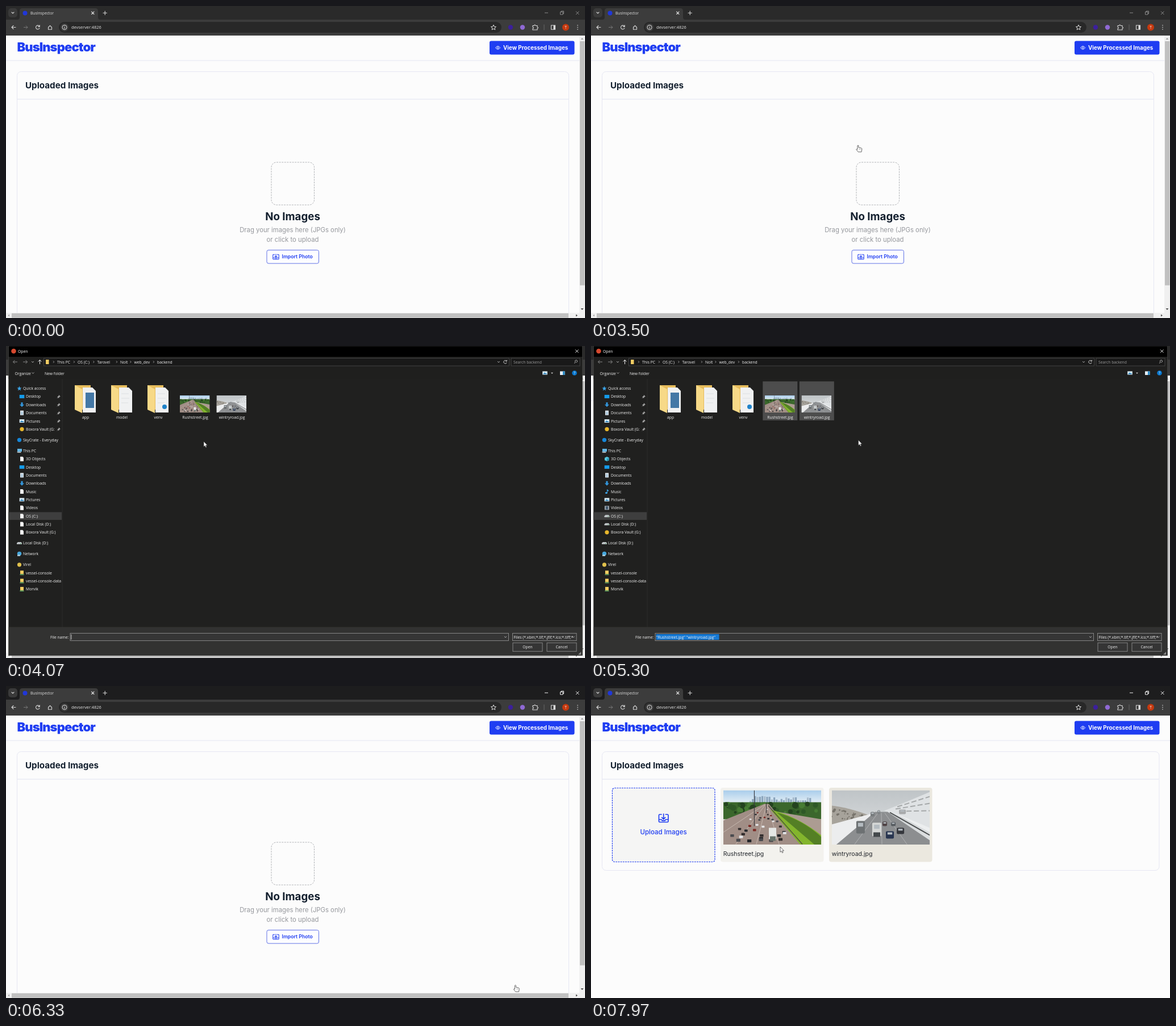
These frames come from a looping animation (1019 px wide and 549 px high, 8000 ms). An HTML page:

```html
<!DOCTYPE html>
<html lang="en">
<head>
<meta charset="utf-8">
<title>Image upload demo</title>
<style>
html, body { margin: 0; width: 100%; height: 100%; overflow: hidden; background: #fcfcfc; }
svg { display: block; width: 100vw; height: 100vh; }
.ui { font-family: "Open Sans", "Noto Sans", sans-serif; }
.page { font-family: Inter, "Open Sans", sans-serif; }
text { white-space: pre; }
</style>
</head>
<body>
<svg id="stage" viewBox="0 0 1019 549" preserveAspectRatio="none"></svg>
<script>
const LOOP = 8000;
const BLUE = '#1f3df2', INK = '#14202f';
const APP = 'BusInspector', FILES = ['Rushstreet.jpg', 'wintryroad.jpg'];

// Markup helpers
const rect = (x, y, w, h, fill, more = '') => `<rect x="${x}" y="${y}" width="${w}" height="${h}" fill="${fill}" ${more}/>`;
const circle = (x, y, r, fill) => `<circle cx="${x}" cy="${y}" r="${r}" fill="${fill}"/>`;
const shape = (d, fill, more = '') => `<path d="${d}" fill="${fill}" ${more}/>`;
const line = (d, color, width = 1, more = '') => shape(d, 'none', `stroke="${color}" stroke-width="${width}" ${more}`);
const text = (x, y, s, size, fill, more = '') => `<text x="${x}" y="${y}" font-size="${size}" fill="${fill}" ${more}>${s}</text>`;
const group = (id, body, more = '') => `<g id="${id}" ${more}>${body}</g>`;
const at = (x, y, body) => `<g transform="translate(${x} ${y})">${body}</g>`;
const range = n => [...Array(n).keys()];
const middle = 'text-anchor="middle"';

function random(seed) {
  return () => (seed = (seed * 16807) % 2147483647) / 2147483647;
}

// Photos, drawn in a 172 x 95.5 box
function cityRoad() {
  const rnd = random(41);
  const towers = range(26).map(i => {
    const h = 4 + rnd() * 9;
    return rect(46 + i * 4.2, 23 - h, 3.2, h, i % 3 ? '#8ba5bd' : '#a9bccd');
  }).join('');
  const bushes = range(46).map(i =>
    circle(rnd() * 172, 24 + rnd() * 15, 2 + rnd() * 4, ['#2f5927', '#477c34', '#24431f'][i % 3])).join('');
  const cars = range(34).map(i => {
    const d = .12 + .85 * rnd(), lane = [-1.05, -.75, -.45, -.15, .12, .38, .6][i % 7], w = 1.5 + 6 * d;
    return rect(76 + lane * 70 * d - w / 2, 25 + 64 * d, w, w * .7, ['#25272b', '#4a4b4f', '#e3e4e6', '#342f2f', '#7c2924'][i % 5], 'rx=".6"');
  }).join('');
  return rect(0, 0, 172, 26, 'url(#sky)') + towers + rect(0, 21, 172, 30, '#3b672c') + bushes +
    shape('M84 36L172 51V95.5H90Z', '#ac9c92') +
    shape('M72 24H80L138 95.5H0V53Z', '#a18e86') +
    shape('M83 34Q130 46 172 79V95.5H135Z', '#83b52d') +
    shape('M94 39Q140 52 172 82V95.5H160Z', '#547f25') +
    line('M76 25L58 95M77 25L98 95M74 25L22 95M73 25L0 74', '#ddd3cb', .6) +
    line('M79 27L139 95', '#4d4b40', 1.3) + cars +
    rect(80, 66, 13, 20, '#e5e7e5') + rect(82, 81, 10, 8, '#69746c') +
    line('M54.5 0V63M75.5 22V40', '#35363b', 1.1);
}

function snowRoad() {
  const rnd = random(97);
  const rocks = range(40).map(() => {
    const x = rnd() * 62;
    return circle(x, 31 + x * .2 + rnd() * (20 - x * .2), .7 + rnd() * 1.6, '#77736b');
  }).join('');
  const car = (x, y, w, h, color) => rect(x, y, w, h, color, 'rx="2"') + rect(x + w * .2, y + h * .15, w * .6, h * .3, '#b4bbc0');
  return rect(0, 0, 172, 95.5, 'url(#mist)') +
    shape('M92 36Q130 21 172 3V66Z', '#dfe2e4') +
    line('M115 29L172 11M112 33L172 23M118 37L172 36', '#a5a8a9', 2, 'stroke-dasharray="9 4"') +
    shape('M0 27Q28 30 66 44L0 66Z', '#a7a39b') + rocks +
    shape('M0 60L74 40L76 43L12 95.5H0Z', '#ecedee') +
    shape('M76 38H98L172 88V95.5H8Z', '#8c8e90') +
    line('M81 40L40 95M87 40L88 95M93 40L132 95', '#b9bbbc', .8) +
    line('M102 39L172 79', '#494c4d', 2) +
    shape('M108 39L172 74V66Z', '#eceeef') +
    car(43, 54, 15, 22, '#6d7173') + car(71, 57, 16, 24, '#d5d7d6') +
    rect(73, 74, 12, 8, '#44494c') + car(95, 72, 14, 13, '#27344f') +
    car(114, 66, 13, 11, '#35373c') + car(89, 55, 8, 8, '#504446') +
    car(104, 56, 8, 7, '#565b60') + car(118, 34, 12, 8, '#a8aaab') +
    car(68, 38, 7, 8, '#777b7d') + car(80, 35, 5, 7, '#7f8385');
}

const photo = (i, x, y, w, h) => `<use href="#photo${i}" x="${x}" y="${y}" width="${w}" height="${h}"/>`;
const symbol = (i, body) => `<symbol id="photo${i}" viewBox="0 0 172 95.5" preserveAspectRatio="none">${body}</symbol>`;
const gradient = (id, a, b) => `<linearGradient id="${id}" x2="0" y2="1"><stop stop-color="${a}"/><stop offset="1" stop-color="${b}"/></linearGradient>`;

const defs = `<defs>${gradient('sky', '#a9cdeb', '#eef4f7')}${gradient('mist', '#bfc4c7', '#e2e4e5')}${gradient('blank', '#a5a5a1', '#3a3a38')}
  <clipPath id="sideClip"><rect x="4" y="58" width="94" height="436"/></clipPath>
  ${symbol(0, cityRoad())}${symbol(1, snowRoad())}</defs>`;

// Browser window
function browser() {
  const icon = d => line(d, '#d6d6d6', 1.1, 'stroke-linecap="round"');
  return group('strip', rect(0, 0, 1019, 30, 'inherit')) +
    rect(4, 4, 16, 16, '#3a3a3a', 'rx="5"') + icon('M10 11L12 13L14 11') +
    shape('M20 24Q24 24 24 20V9Q24 4 29 4H157Q162 4 162 9V20Q162 24 166 24Z', '#3c3c3c') +
    rect(0, 24, 1019, 28, '#3c3c3c') +
    circle(33.5, 12.5, 4, '#2037d8') + text(43, 15, APP, 6.7, '#e0e0e0') +
    icon('M150.5 10L155 14.5M155 10L150.5 14.5M171 12.3H177.5M174.2 9V15.5') +
    group('controls', line('M948 12H954M975.5 10.5H980V15H975.5ZM977 10.5V9H981.5V13.5H980M1003 9.5L1008.5 15M1008.5 9.5L1003 15', 'inherit')) +
    icon('M17 37.5H10M13 34.5L10 37.5L13 40.5') +
    line('M31 37.5H38M35 34.5L38 37.5L35 40.5', '#777') +
    icon('M58.7 35.5A3.4 3.4 0 1 0 59 39M59.2 33.8V36.4H56.6M74.5 37.5L77.5 34.5L80.5 37.5V41.2H74.5Z') +
    rect(93, 28, 779, 19, '#282828', 'rx="9.5"') + circle(103, 37.5, 7, '#3c3c3c') +
    line('M99 37.5A4 4 0 1 0 107 37.5A4 4 0 1 0 99 37.5M103 37V39.8M103 35.2V36', '#ddd') +
    text(115, 40.3, 'devserver:4826', 7.4, '#e6e6e6') +
    group('fileIcon', icon('M835.5 33H840L842.8 36V42.3H835.5ZM839.7 33V36.2H842.8')) +
    line('M858 33.2L859.3 36.2L862.5 36.5L860 38.6L860.8 41.8L858 40.1L855.2 41.8L856 38.6L853.5 36.5L856.7 36.2Z', '#ddd') +
    circle(888, 37.5, 4.2, '#3c1f9c') + circle(909, 37.5, 4.2, '#9069d4') +
    icon('M927 34.5H929.5Q930.5 31.5 932 34.5H935V37Q938 38 935 39.5V42H927V39.8Q930 38.5 927 37Z') +
    rect(946.5, 32.5, 1, 10, '#666') + icon('M959.5 34H966.5V41.3H959.5Z') + rect(963.5, 34, 3, 7.3, '#ddd') +
    circle(985, 37.5, 6, '#c6390f') + text(985, 40, 'T', 6.5, '#fff', middle) +
    circle(1006, 34, .8, '#ddd') + circle(1006, 37.5, .8, '#ddd') + circle(1006, 41, .8, '#ddd');
}

// Web page
const importIcon = (x, y, k) => `<g transform="translate(${x} ${y}) scale(${k})">` +
  line('M-2 -4H-4.5Q-5.5 -4 -5.5 -3V4Q-5.5 5 -4.5 5H4.5Q5.5 5 5.5 4V-3Q5.5 -4 4.5 -4H2M0 -5V1.5M-2.3 -.8L0 1.5L2.3 -.8M-5 2H-2.5L-1.5 3.2H1.5L2.5 2H5', BLUE, 1.1) + '</g>';

function page() {
  const border = '#e6e7f3';
  const panel = (w, h) => rect(19.5, 115.5, w, h, 'none', `stroke="${border}" rx="7"`) + rect(20, 163.5, w - 1, 1, '#e2e3f1');
  const card = i => {
    const x = 228 + i * 191;
    return rect(x, 179, 181.5, 130.5, '#ebe8df', `rx="4" id="card${i}"`) + photo(i, x + 4.8, 183.5, 172.4, 95.5) +
      text(x + 4.7, 299, FILES[i], 10.5, '#20242a');
  };
  const empty = panel(971, 500) +
    rect(467, 275, 75.5, 75, 'none', 'rx="9" stroke="#b1b3b7" stroke-dasharray="3 1.6"') +
    text(504.5, 377, 'No Images', 18.7, INK, `font-weight="700" ${middle}`) +
    text(504.5, 398.2, 'Drag your images here (JPGs only)', 11.3, '#96989d', middle) +
    text(504.5, 415.2, 'or click to upload', 11.3, '#96989d', middle) +
    rect(459, 429.5, 91.5, 23.5, '#fdfdff', 'rx="3" stroke="#6072e6"') + importIcon(475, 441, .95) +
    text(485.5, 444.2, 'Import Photo', 8.7, BLUE, 'font-weight="600"') +
    rect(1009, 52, 10, 497, '#f0f0f0') + rect(1010, 62, 8.5, 429.5, '#c0c0c0') +
    rect(0, 540, 1009, 9, '#f0f0f0') + rect(10, 540.7, 980, 8, '#c0c0c0') +
    shape('M1011.5 59H1016.5L1014 56ZM6 542.5V546.5L3.5 544.5Z', '#a0a0a0') +
    shape('M1011.5 532H1016.5L1014 535ZM1003 542.5V546.5L1006 544.5Z', '#505050');
  const gallery = panel(980.5, 209) +
    rect(37.5, 179.5, 180.5, 130, '#f5f5f4', `rx="4" stroke="${BLUE}" stroke-width="1.2" stroke-dasharray="2.8 1.4"`) +
    importIcon(127.7, 232, 1.5) + text(127.5, 261.2, 'Upload Images', 11.5, BLUE, `font-weight="500" ${middle}`) + card(0) + card(1);
  return rect(0, 52, 1019, 497, '#fcfcfc') + rect(0, 95.5, 1019, 1, '#e6e7f3') +
    text(19.5, 80, APP, 22, BLUE, 'font-weight="900" letter-spacing="-.9"') +
    rect(851, 61.5, 149.5, 24, BLUE, 'rx="3"') +
    line('M861.5 73.5Q865.7 67.8 869.8 73.5Q865.7 79 861.5 73.5ZM864.3 73.5A1.4 1.4 0 1 0 867.1 73.5A1.4 1.4 0 1 0 864.3 73.5', '#fff', .9) +
    text(875, 77, 'View Processed Images', 9.8, '#fff', 'font-weight="700"') +
    text(34, 144.8, 'Uploaded Images', 15.2, INK, 'font-weight="700"') +
    group('empty', empty) + group('gallery', gallery);
}

// File dialog
const ICONS = {
  doc: shape('M-3 -4H1.3L3 -2.2V4H-3Z', '#f2f2f2'),
  page: shape('M-3 -4H3V4H-3Z', '#e9eef2') + line('M-2 -1.5H2M-2 .5H2M-2 2.3H2', '#4a89b4', .7),
  star: shape('M0 -4L1.2 -1.2L4 -1L1.8 .9L2.5 3.8L0 2.2L-2.5 3.8L-1.8 .9L-4 -1L-1.2 -1.2Z', '#3ca4e8'),
  desk: rect(-4.3, -3, 8.6, 6, '#149bea'),
  down: shape('M-1.6 -4H1.6V-.3H4L0 4L-4 -.3H-1.6Z', '#3396db'),
  pic: rect(-4.3, -3, 8.6, 6, '#dceffa') + shape('M-3.5 2L-.8 -1L1 .6L2 -.3L3.7 2Z', '#2b80b8'),
  vault: circle(0, 0, 3.6, '#e8b72c'),
  cloud: circle(0, 0, 3.7, '#1687d9'),
  pc: rect(-3.5, -3.5, 8, 5, '#65b9e8') + shape('M-4.5 2L2 1.6L3.5 3.5H-3Z', '#c8d2d8'),
  cube: shape('M0 -4L4 -2V2.3L0 4L-4 2.3V-2Z', '#53c5dc') + shape('M0 0L4 -2V2.3L0 4Z', '#2b91ad'),
  note: shape('M0 -4L3 -2V0L1 -1.5V2.5A2 1.5 0 1 1 0 1.2Z', '#3da5ea'),
  film: rect(-4, -3.5, 8, 7, '#9aa3ad') + rect(-2, -2.5, 4, 5, '#41596e'),
  disk: shape('M-4.5 0L-2.5 -1.8H3L4.5 0V2H-4.5Z', '#c2c7ca') + rect(1.5, .5, 2, .8, '#3d9b52'),
  net: circle(0, -.5, 3.7, '#46a7dc') + rect(-3.5, 1.5, 5, 2.3, '#b8d7e6'),
  dot: circle(0, 0, 3.6, '#e0c04c'),
  folder: shape('M-3 -4H3V2H-3Z', '#f2cd62') + rect(-3.5, 2.2, 7, 1.7, '#64a964')
};

// label, level, icon, still generic while loading
const TREE = [
  ['Quick access', 0, 'star'], ['Desktop', 1, 'desk'], ['Downloads', 1, 'down'], ['Documents', 1, 'page'],
  ['Pictures', 1, 'pic'], ['Boxora Vault (G:', 1, 'vault'], ['SkyCrate - Everyday', 0, 'cloud'], ['This PC', 0, 'pc'],
  ['3D Objects', 1, 'cube', 1], ['Desktop', 1, 'desk'], ['Documents', 1, 'page'], ['Downloads', 1, 'down'],
  ['Music', 1, 'note', 1], ['Pictures', 1, 'pic'], ['Videos', 1, 'film', 1], ['OS (C:)', 1, 'disk', 1],
  ['Local Disk (D:)', 1, 'disk', 1], ['Boxora Vault (G:)', 1, 'vault', 1], ['Local Disk (D:)', 0, 'disk'],
  ['Network', 0, 'net'], ['Virel', 0, 'dot'], ['vessel-console', 1, 'folder'],
  ['vessel-console-data', 1, 'folder'], ['Morvik', 1, 'folder']
];
const ROW = 14.35;

function sidebar(stage) {
  let y = 74.6 - 19, out = '';
  TREE.forEach(([label, level, icon, slow], i) => {
    const child = i > 7 && i < 18;
    if (!stage && child) return;
    y += level ? ROW : 19;
    if (i === (stage ? 15 : 7)) out += rect(4, y - 6.8, 94, 13.6, stage ? '#3e3e3e' : '#45453f');
    const generic = !stage || (stage === 1 && slow);
    const bare = !stage && (i === 7 || icon === 'net');
    if (!bare) out += at(level ? 28 : 23.5, y, ICONS[generic ? 'doc' : icon]);
    out += text(level ? 35 : 30, y + 2.5, label, 6.8, '#f0f0f0');
    if (i > 0 && i < 6) out += at(93, y, shape('M0 -3L3 0L1.6 .2L.3 1.6L0 3L-3 0L-1.5 -.2L-.2 -1.5Z', '#a5a5a5') + line('M-1 1L-3 3', '#a5a5a5', .8));
  });
  return group('tree' + stage, out, 'clip-path="url(#sideClip)"');
}

function dialog() {
  const white = '#f0f0f0', grey = '#9a9a9a';
  const label = (x, y, s, fill = white, more = '') => text(x, y, s, 6.8, fill, more);
  const chevron = (x, y) => line(`M${x - 2} ${y - 1}L${x} ${y + 1}L${x + 2} ${y - 1}`, '#bbb', .9);
  const folder = (x, name, mark = '') => at(x, 0,
    shape('M-19 69H9V112H-19Z', '#e6bc5c') + shape('M-5 73H12L18 79V117H-5Z', '#f0f1f2') +
    line('M-1 84H12M-1 92H13M-1 100H11', '#d3d7da', .7) + mark +
    shape('M-19 69L-6 76V118L-19 112Z', '#f7d987') + label(0, 127.8, name, white, middle));
  const picture = (i, x) => rect(x - 30, 62.3, 61, 68.5, '#4d4d4d', `id="pick${i}"`) +
    photo(i, x - 26.3, 87, 52.6, 30) + label(x + .8, 127.8, FILES[i], white, middle);
  const crumbs = [[90, 'This PC'], [126, 'OS (C:)'], [160.5, 'Tarovel'], [201, 'Nolt'], [225.5, 'web_dev'], [266, 'backend']]
    .map(([x, s]) => label(x, 30.6, s) + line(`M${x - 7} 26.3L${x - 5.3} 28L${x - 7} 29.7`, '#bbb', .8)).join('');
  const field = (x, y, w, h, id = '') => rect(x, y, w, h, '#353535', `stroke="#858585" ${id}`);
  const loaded = rect(4.5, 19, 1010, 39, '#1f1f1e') +
    line('M20 28H12.5M15.5 25L12.5 28L15.5 31M30 28H37.5M34.5 25L37.5 28L34.5 31', '#888') + chevron(47, 28) +
    line('M59.5 32V24.5M56.5 27.5L59.5 24.5L62.5 27.5', white) +
    rect(66.5, 21.5, 819, 13.5, '#191919', 'stroke="#424242"') + rect(70, 24, 5.5, 8, '#f0ca62') + crumbs +
    chevron(867, 28) + line('M880.5 26A2.8 2.8 0 1 0 881.3 29M881.5 24.5V26.8H879', '#ddd', .9) +
    rect(889, 21.5, 121, 13.5, '#191919', 'stroke="#424242"') + label(893, 30.6, 'Search backend', grey) +
    line('M1000 30.5L1002.3 28.4A2 2 0 1 1 1003.5 28.8', '#ccc', .9) +
    label(15.5, 50.5, 'Organize') + chevron(47.5, 47.5) + label(68, 50.5, 'New folder') +
    at(948.5, 47.5, ICONS.pic) + shape('M959 46.8H963L961 49Z', '#ccc') +
    label(78, 514.6, 'File name:') + field(113, 505.5, 771.5, 13) + chevron(879, 512) +
    rect(114.5, 507, 111, 10, '#1679d4', 'id="nameBack"') + group('nameText', label(115, 514.6, FILES.map(f => `"${f}"`).join(' '))) +
    rect(114.5, 507.5, .8, 9, '#eee', 'id="caret"') +
    field(891.5, 505.5, 112.5, 13) + label(893.5, 514.6, 'Files (*.xbm;*.tif;*.jfif;*.ico;*.tiff;*') + chevron(998.5, 512) +
    field(892, 522.3, 52, 15, 'id="openButton"') + field(952, 522.3, 52, 15) +
    label(918, 532.4, 'Open', white, middle) + label(978, 532.4, 'Cancel', white, middle) +
    shape('M1012 538V543H1007Z', '#888');
  const raw = rect(4.5, 19, 1010, 31, 'url(#blank)') + rect(78.3, 506.3, 31.5, 10, '#fff') + rect(112.8, 504.8, 771.5, 13.5, '#fff') +
    rect(891.6, 504.8, 112.5, 13.5, '#fff') + rect(891.6, 521.7, 52.5, 15, '#fff') + rect(951.5, 521.7, 52.5, 15, '#fff') +
    rect(1007, 537, 7, 7, '#fff');
  return group('dialog',
    rect(4.5, 0, 1010, 544.5, '#20201f') + rect(4.5, 0, 1010, 19, '#000') +
    group('dialogIcon', circle(13.5, 9, 4.3, '#d6492f')) + group('dialogTitle', label(21, 11.7, 'Open', '#fff')) +
    line('M1002 6.3L1007.5 11.8M1007.5 6.3L1002 11.8', '#fff', .9) +
    rect(98.5, 58, 1, 437, '#2d2d2c') + rect(4.5, 494.5, 1010, 50, '#323231') +
    group('loaded', loaded) + group('raw', raw) +
    rect(975, 44.5, 8.5, 6.5, '#e4edf3') + rect(980, 44.5, 3.5, 6.5, '#2a8cc8') +
    circle(1000.5, 47.5, 4.3, '#0878d0') + label(1000.5, 50, '?', '#fff', middle) +
    sidebar(0) + sidebar(1) + sidebar(2) +
    folder(140, 'app', rect(0, 82, 15, 27, '#4478a6')) + folder(204, 'model') + folder(268, 'venv', circle(11, 107, 4, '#1f82c9')) +
    picture(0, 332.3) + picture(1, 396.8) +
    rect(4.5, 0, 1010, 544.5, 'none', 'stroke="#4a4a4a" stroke-width=".6"'));
}

const pointer = group('arrow', shape('M0 0V9.3L2.1 7.4L3.6 10.6L5.1 9.9L3.7 6.8H6.5Z', '#fff', 'stroke="#333" stroke-width=".7"')) +
  group('hand', shape('M-1 .8Q0 -.8 1 .8V4L5.8 5Q7 5.5 6.8 7L6 11.8H.2L-3.2 7.4Q-2.8 5.8 -1 7.4Z', '#fff', 'stroke="#555" stroke-width=".9"') + line('M2.5 6V8M4.3 6.2V8', '#777', .6));

document.getElementById('stage').innerHTML = defs +
  `<g class="ui">${browser()}</g><g class="page">${page()}</g><g class="ui">${dialog()}</g>` + group('cursor', pointer);

// Timeline
const PATH = [
  [380, 720, 556], [830, 690, 384], [1650, 655, 362], [1920, 490, 262], [2230, 604, 345], [2500, 575, 318],
  [3250, 505, 272], [3500, 470, 245], [3770, 377, 177], [4070, 348, 168], [4550, 334, 106], [4750, 334, 106],
  [4950, 398, 104], [5150, 402, 108], [5800, 903, 529], [5950, 905, 532], [6250, 905, 532], [6530, 863, 503],
  [6690, 778, 434], [7030, 178, 322], [7230, 338, 341], [7470, 338, 341], [7900, 333, 283], [8000, 333, 283]
];
const el = id => document.getElementById(id);
const show = (id, on) => el(id).style.display = on ? '' : 'none';
const clamp = v => Math.max(0, Math.min(1, v));

function cursorAt(t) {
  const i = PATH.findIndex(p => p[0] > t);
  if (i < 1) return PATH[i < 0 ? PATH.length - 1 : 0].slice(1);
  const [a, b] = [PATH[i - 1], PATH[i]];
  const p = (t - a[0]) / (b[0] - a[0]), e = p * p * (3 - 2 * p);
  return [a[1] + (b[1] - a[1]) * e, a[2] + (b[2] - a[2]) * e];
}

function update(t) {
  const inactive = t < 430 || (t >= 3250 && t < 6330);
  el('strip').setAttribute('fill', inactive ? '#2a2a2a' : '#1d1d1e');
  el('strip').firstChild.removeAttribute('fill');
  el('controls').setAttribute('stroke', inactive ? '#8a8a8a' : '#f2f2f2');
  el('controls').firstChild.removeAttribute('stroke');

  const uploaded = t >= 6400;
  show('empty', !uploaded);
  show('gallery', uploaded);
  show('fileIcon', uploaded && t < 7550);

  const opening = clamp((t - 3660) / 250), closing = clamp((t - 6170) / 160);
  const eased = 1 - (1 - opening) ** 2;
  const scale = .962 + .038 * eased - .021 * closing;
  const open = opening > 0 && closing < 1;
  show('dialog', open);
  el('dialog').setAttribute('transform', `translate(509 272) scale(${scale}) translate(-509 -272)`);
  el('dialog').setAttribute('opacity', Math.min(1, eased * 1.08) * (1 - closing ** 1.5));
  const stage = t < 3880 ? 0 : t < 4300 ? 1 : 2;
  [0, 1, 2].forEach(i => show('tree' + i, i === stage));
  show('raw', !stage);
  show('loaded', stage);
  show('dialogIcon', !closing);
  el('dialogTitle').setAttribute('transform', `translate(${closing ? -8 : 0} 0)`);

  const [x, y] = cursorAt(t);
  const both = t >= 5030;
  show('pick0', t >= 4650);
  show('pick1', both);
  show('nameText', both);
  show('nameBack', both);
  show('caret', !both);
  el('openButton').setAttribute('fill', x > 892 && y > 522 ? '#777' : '#353535');

  [0, 1].forEach(i => {
    const left = 228 + i * 191;
    const over = x > left && x < left + 181 && y > 179 && y < 309;
    el('card' + i).setAttribute('fill', over ? '#f3f2ee' : '#ebe8df');
  });
  const clickable = !uploaded && !open && x > 20 && x < 990 && y > 164 && y < 540;
  show('hand', clickable);
  show('arrow', !clickable);
  show('cursor', t >= 380);
  el('cursor').setAttribute('transform', `translate(${x} ${y})`);
}

function frame() {
  update(performance.now() % LOOP);
  requestAnimationFrame(frame);
}
frame();
</script>
</body>
</html>
```
